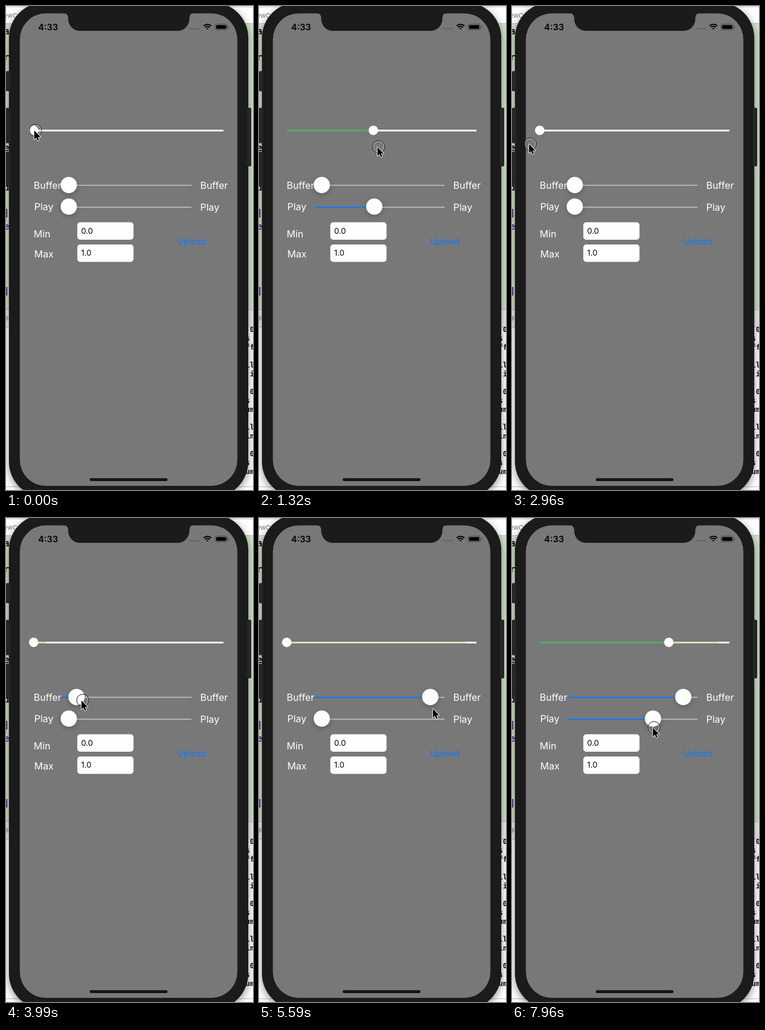
An HTML page with a canvas that plays this animation: 419 px wide and 818 px high, repeating every 8000 ms.

```html
<!DOCTYPE html>
<html lang="en">
<head>
<meta charset="utf-8">
<title>Buffer slider</title>
<style>
  html, body { margin: 0; width: 100%; height: 100%; overflow: hidden; background: #fff; }
  canvas { display: block; width: 419px; height: 818px; }
</style>
</head>
<body>
<canvas id="stage"></canvas>
<script>
const W = 419, H = 818, LOOP = 8000, STEP = 147.3, LAST = 54;
const SANS = 'Inter, Roboto, sans-serif';
const MONO = '"DejaVu Sans Mono", "Liberation Mono", monospace';
const canvas = document.getElementById('stage');
const g = canvas.getContext('2d');
const ratio = window.devicePixelRatio || 1;
canvas.width = W * ratio;
canvas.height = H * ratio;
g.scale(ratio, ratio);

// Turning points of the pointer: [step, x, y]
const PATH = [
  [0, 48, 210], [12, 252, 247], [20, 29, 233], [24, 108, 307], [26, 112, 307],
  [32, 209, 315], [34.3, 300, 322], [38, 295, 322], [39, 295, 322],
  [44.5, 105, 342], [47, 170, 345.5], [LAST, 239, 354]
];

// Each drag maps pointer x to a slider value
const seek = { from: 0, to: 20, x: 54, span: 322 };
const load = { from: 26, to: 35, x: 115, span: 195 };
const scrub = { from: 44, to: LAST, x: 105, span: 197 };

const clamp = (v, lo, hi) => Math.max(lo, Math.min(hi, v));

function pointerAt(s) {
  const i = Math.max(1, PATH.findIndex(p => p[0] >= s));
  const [s0, x0, y0] = PATH[i - 1], [s1, x1, y1] = PATH[i];
  const p = (s - s0) / (s1 - s0);
  return [x0 + (x1 - x0) * p, y0 + (y1 - y0) * p];
}

function valueAt(drag, s) {
  const [x] = pointerAt(clamp(s, drag.from, drag.to));
  return clamp((x - drag.x) / drag.span, 0, 1);
}

function box(x, y, w, h, color, r = 0) {
  g.fillStyle = color;
  g.beginPath();
  g.roundRect(x, y, w, h, r);
  g.fill();
}

function disc(x, y, r, color) {
  g.fillStyle = color;
  g.beginPath();
  g.arc(x, y, r, 0, Math.PI * 2);
  g.fill();
}

function ring(x, y, r, color, width) {
  g.strokeStyle = color;
  g.lineWidth = width;
  g.beginPath();
  g.arc(x, y, r, 0, Math.PI * 2);
  g.stroke();
}

function text(str, x, y, font, color) {
  g.font = font;
  g.fillStyle = color;
  g.fillText(str, x, y);
}

function shadowed(alpha, blur, dy, paint) {
  g.save();
  g.shadowColor = `rgba(0,0,0,${alpha})`;
  g.shadowBlur = blur * ratio;
  g.shadowOffsetY = dy * ratio;
  paint();
  g.restore();
}

function backdrop() {
  box(0, 0, W, H, '#fff');
  box(0, 30, W, 484, '#d0e2c9');
  box(0, 514, W, 29, '#ededed');
  [1, 29, 513, 542, 812].forEach(y => box(0, y, W, 1, '#bdbdbd'));
  text('ewC', -4, 20, '11px ' + SANS, '#777');
  text('FF', -6, 532, '10px ' + SANS, '#777');
  const code = 'bold 16px ' + MONO;
  [['a', 48], ['r', 92], ['e', 245], ['d', 312]].forEach(([c, y]) => text(c, -4, y, code, '#111'));
  [[']', 355], ['e', 378], [']', 487]].forEach(([c, y]) => text(c, -4, y, code, '#5b3291'));
  const log = ' 0|s|ff||ll| i|:| 0|s|um||ll|in|:| 0|s|um'.split('|');
  log.forEach((line, i) => text(line, 406.5, 551 + i * 15, 'bold 12px ' + MONO, '#111'));
}

function phone() {
  shadowed(0.45, 14, 4, () => box(5, -6, 406, 836, '#1b1b1b', 60));
  [[110, 34], [172, 60], [246, 58]].forEach(([y, h]) => box(0, y, 7, h, '#262626', [2, 0, 0, 2]));
  box(409, 172, 7, 99, '#262626', [0, 2, 2, 0]);
  box(23.5, 12.5, 369, 798.5, '#787878', 44);

  g.fillStyle = '#1b1b1b';
  g.beginPath();
  g.moveTo(97, 12);
  g.quadraticCurveTo(105.5, 12, 105.5, 21);
  g.arcTo(105.5, 42, 126, 42, 20);
  g.arcTo(311, 42, 311, 21, 20);
  g.lineTo(311, 21);
  g.quadraticCurveTo(311, 12, 319, 12);
  g.fill();
  box(142, 798, 132, 5, '#161616', 2.5);
}

function statusBar() {
  text('4:33', 54.5, 40.5, '600 15px ' + SANS, '#000');
  for (let i = 0; i < 4; i++) disc(313.5 + i * 4.7, 38.5, 1.4, '#5c5c5c');

  g.strokeStyle = '#000';
  g.lineWidth = 2.2;
  [1.5, 5.5, 9].forEach(r => {
    g.beginPath();
    g.arc(341.8, 40, r, -Math.PI * 0.75, -Math.PI * 0.25);
    g.stroke();
  });

  g.strokeStyle = '#494949';
  g.lineWidth = 1;
  g.beginPath();
  g.roundRect(354.5, 30.5, 21, 10, 3);
  g.stroke();
  box(356.3, 32.2, 17.4, 6.6, '#000', 1.5);
  box(376.5, 34, 1.3, 3.5, '#494949', 1);
}

function form() {
  const label = '16.3px ' + SANS;
  [['Buffer', 47, 309], ['Play', 48, 345], ['Buffer', 329.5, 309], ['Play', 329.5, 346],
    ['Min', 47, 391], ['Max', 48, 425]].forEach(([s, x, y]) => text(s, x, y, label, '#fff'));
  text('Upload', 290.5, 402.5, '14.6px ' + SANS, '#0a7aff');
  [['0.0', 365.5], ['1.0', 403]].forEach(([s, y]) => {
    box(121, y, 95.3, 29.5, '#fff', 5);
    text(s, 127.5, y + 19.3, '13.3px ' + SANS, '#000');
  });
}

function player(play, buffer) {
  const x = 47, w = 322, y = 209, h = 3;
  box(x, y, w, h, '#fff', 1);
  box(x, y, w * buffer, h, '#cbe5b3');
  box(x, y, w * play, h, '#58a75f');
  disc(x + w * play, 210.2, 8, '#fff');
}

function slider(trackY, thumbY, value) {
  const x = 106.5 + 195 * value;
  box(93.5, trackY - 1, 221.5, 2, '#b3b3b3', 1);
  if (value) box(93.5, trackY - 1, x - 93.5, 2, '#0f7af5', 1);
  shadowed(0.22, 8, 3, () => disc(x, thumbY, 13.8, '#fff'));
}

function pointer(x, y, pressed) {
  if (pressed) {
    ring(x + 2, y, 9.2, 'rgba(255,255,255,.9)', 1);
    ring(x + 2, y, 10.1, '#111', 1);
  }
  g.beginPath();
  [[0, 0.5], [0, 15.5], [3.4, 12.3], [5.7, 17.4], [8, 16.4], [5.9, 11.4], [10.6, 11.4]]
    .forEach(([dx, dy]) => g.lineTo(x + dx, y + dy));
  g.closePath();
  g.lineJoin = 'round';
  g.lineWidth = 1.7;
  g.strokeStyle = '#fff';
  g.stroke();
  g.fillStyle = '#000';
  g.fill();
}

function draw(now) {
  const s = Math.min(LAST, Math.floor((now % LOOP + 10) / STEP));
  const play = valueAt(s < scrub.from ? seek : scrub, s);
  const buffer = valueAt(load, s);
  const [x, y] = pointerAt(s);
  backdrop();
  phone();
  statusBar();
  form();
  player(play, buffer);
  slider(303, 302.6, buffer);
  slider(340, 339, play);
  pointer(Math.round(x), Math.round(y), [seek, load, scrub].some(d => s >= d.from && s <= d.to));
}

const start = performance.now();
function tick() {
  draw(performance.now() - start);
  requestAnimationFrame(tick);
}
tick();
</script>
</body>
</html>
```
